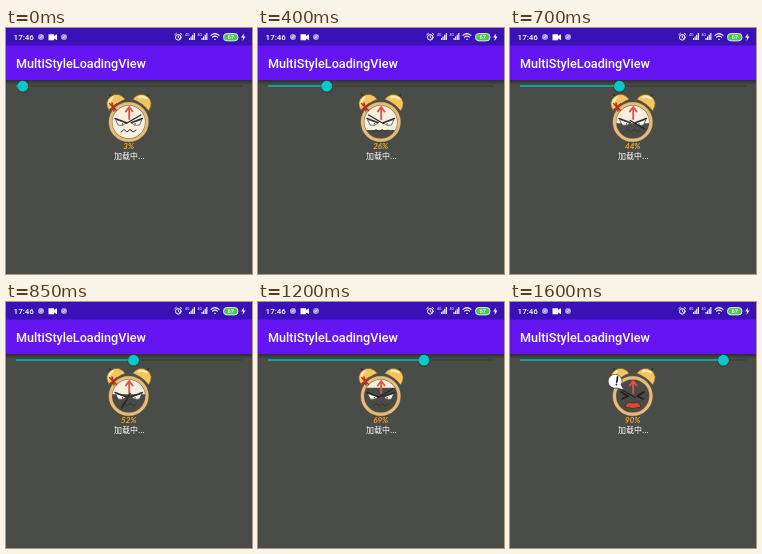
Animation of 246 by 246 pixels, one loop 1.65 s. Source, as an HTML page:

```html
<!DOCTYPE html>
<html lang="en">
<head>
<meta charset="utf-8">
<title>MultiStyleLoadingView</title>
<style>
  html, body { margin: 0; width: 100%; height: 100%; overflow: hidden; background: #4a4c48; }
  svg { display: block; width: 100vw; height: 100vh; }
  text { fill: #fff; font-family: Roboto, sans-serif; }
  .line { fill: none; stroke-linecap: round; stroke-linejoin: round; }
  #percent { fill: #f0a32e; font: italic 700 8px Lato, sans-serif; }
  #caption { font: 8px "Noto Sans CJK SC", "Noto Sans CJK", sans-serif; }
</style>
</head>
<body>
<svg viewBox="0 0 246 246">
  <defs>
    <linearGradient id="shade" x2="0" y2="1">
      <stop stop-color="#000" stop-opacity=".38"/>
      <stop offset="1" stop-color="#000" stop-opacity="0"/>
    </linearGradient>
    <clipPath id="unfilled"><rect id="level" x="100" y="72" width="45"/></clipPath>
    <g id="signal" fill="#fff">
      <path d="M4 10h1.1v2H4zM5.6 8.5h1.1V12H5.6zM7.2 6.8h1.1V12H7.2zM8.8 5h1.1v7H8.8z"/>
      <text x="0" y="8" font-size="3.6">4G</text>
    </g>
    <g id="bell">
      <path d="M0-7V-9" class="line" stroke="#35332d" stroke-width="2"/>
      <path d="M-10 4Q-9-7 0-7T10 4Q0 1-10 4Z" fill="#f4c55f" stroke="#6f5530" stroke-width=".6"/>
      <path d="M-6-1.5Q-4-5 1-5.2" class="line" stroke="#ffeeb4" stroke-width="2"/>
    </g>
    <g id="dot"><circle r="3" fill="#a797dc"/><path d="M-1.5 1.5L1.5-1.5" stroke="#e2d9fa" stroke-width="1"/></g>
  </defs>

  <rect width="246" height="246" fill="#4a4c48"/>
  <rect y="52" width="246" height="5" fill="url(#shade)"/>
  <rect width="246" height="52" fill="#6415f2"/>
  <rect width="246" height="17.5" fill="#3a10b7"/>

  <text x="7.6" y="12" font-size="8" font-weight="500">17:46</text>
  <use href="#dot" x="35" y="9"/>
  <path d="M42.5 6.3h5.5v1.7L51 6.3v6l-3-1.7v1.7h-5.5z" fill="#fff"/>
  <use href="#dot" x="58" y="9"/>
  <g class="line" stroke="#fff">
    <circle cx="172.3" cy="9.3" r="2.8"/>
    <path d="M172.3 7.7V9.5L173.6 10.3M168.8 6.6L170.4 5.3M175.8 6.6L174.2 5.3" stroke-width=".9"/>
  </g>
  <use href="#signal" x="179"/>
  <use href="#signal" x="191.5"/>
  <g class="line" stroke="#fff" stroke-width="1.1">
    <path d="M205 7.3Q209 4 213 7.3M206.5 9.2Q209 7 211.5 9.2M208.6 11.3H209.4"/>
  </g>
  <rect x="217.5" y="5.5" width="14.5" height="7.4" rx="3.4" fill="#4fc653" stroke="#fff" stroke-width=".8"/>
  <text x="224.7" y="11.3" font-size="5.8" font-weight="500" text-anchor="middle">67</text>
  <path d="M237.8 5.5L235.2 9.5H237L236.5 13L239.5 8.5H237.6Z" fill="#fff"/>
  <text x="10" y="39.8" font-size="12.65" font-weight="500">MultiStyleLoadingView</text>

  <path d="M10 58H236" stroke="#363835" stroke-width="1"/>
  <path id="track" stroke="#08bcb8" stroke-width="1.5"/>
  <g id="thumb">
    <circle cy="59.1" r="6.2" opacity=".18"/>
    <circle cy="58.2" r="5.4" fill="#08c9c8"/>
  </g>

  <use href="#bell" transform="translate(109 74) rotate(-36)"/>
  <use href="#bell" transform="translate(137 74) rotate(36)"/>
  <circle cx="122.7" cy="94" r="18" fill="#4a4a46"/>
  <circle cx="122.7" cy="94" r="18" fill="#f5efe0" clip-path="url(#unfilled)"/>
  <circle cx="122.7" cy="94" r="18.3" class="line" stroke="#83693f" stroke-width="4"/>
  <circle cx="122.7" cy="94" r="18.3" class="line" stroke="#e4bc7c" stroke-width="3"/>
  <path d="M123.2 91V80M119.8 83.5L123.2 79L126.6 83.5" class="line" stroke="#de5541" stroke-width="1.9"/>
  <g id="eyes">
    <path d="M109.5 91.5L120 95Q117 98.8 112 97ZM136 91.5L125.5 95Q128.5 98.8 133.5 97Z" fill="#fff" stroke="#33312c" stroke-width=".7"/>
    <path d="M109 90.3L120.3 94.6M136.5 90.3L125.2 94.6" class="line" stroke="#292823" stroke-width="1.3"/>
    <path d="M115.8 95.2h1.2v1.2h-1.2zM128.5 95.2h1.2v1.2h-1.2z" fill="#25231f"/>
    <path d="M115 104L118 101.5L121 104L124 101.5L127 104L130 102" class="line" stroke="#3a352f" stroke-width="1"/>
  </g>
  <g id="rage">
    <path d="M111 90L118 94L112 97M134 90L127 94L133 97" class="line" stroke="#211d1a" stroke-width="1.7"/>
    <path d="M115 105Q116 99 123 101Q130 99 131 105Q123 108 115 105Z" fill="#d44c3b" stroke="#3b211d" stroke-width=".7"/>
  </g>
  <path id="hand" d="M122.7 97V80" class="line" stroke="#25231f" stroke-width="1.3"/>
  <path id="cross" d="M103.5 75.5L110.5 82.5M110.5 76L103.5 82M106 75L108 83" class="line" stroke="#b92f22" stroke-width="1.5"/>
  <g id="alert">
    <path d="M111 83L114 88L107 86A7 7 0 1 1 111 83Z" fill="#fff" stroke="#393834" stroke-width=".7"/>
    <path d="M107.5 75L106.8 80M106.4 82.5V82.6" class="line" stroke="#292823" stroke-width="1.8"/>
  </g>
  <text id="percent" x="122.7" y="121" text-anchor="middle"></text>
  <text id="caption" x="108" y="131">加载中...</text>
</svg>
<script>
const LOOP = 1650, STEP = 50;
// time, progress
const keys = [[0, 3], [200, 10], [400, 26], [700, 44], [1050, 62], [1400, 78], [1600, 90]];
const el = id => document.getElementById(id);
const show = (id, on) => el(id).setAttribute("visibility", on ? "visible" : "hidden");

function progressAt(time) {
  let i = 0;
  while (i < keys.length - 2 && time >= keys[i + 1][0]) i++;
  const [t0, p0] = keys[i], [t1, p1] = keys[i + 1];
  return Math.round(p0 + (p1 - p0) * (time - t0) / (t1 - t0));
}

function draw(now) {
  const time = Math.floor((now % LOOP) / STEP) * STEP;
  const progress = progressAt(time);
  const x = 10 + 2.26 * progress;
  const angry = time >= 1500;
  el("track").setAttribute("d", `M10 58H${x}`);
  el("thumb").setAttribute("transform", `translate(${x} 0)`);
  el("percent").textContent = progress + "%";
  // The dark filling rises from the bottom of the dial.
  el("level").setAttribute("height", 40 - 0.38 * progress);
  el("hand").setAttribute("transform", `rotate(${60 + 0.6 * time} 122.7 94)`);
  show("eyes", !angry);
  show("cross", !angry);
  show("rage", angry);
  show("alert", angry);
  requestAnimationFrame(draw);
}

draw(performance.now());
</script>
</body>
</html>
```
